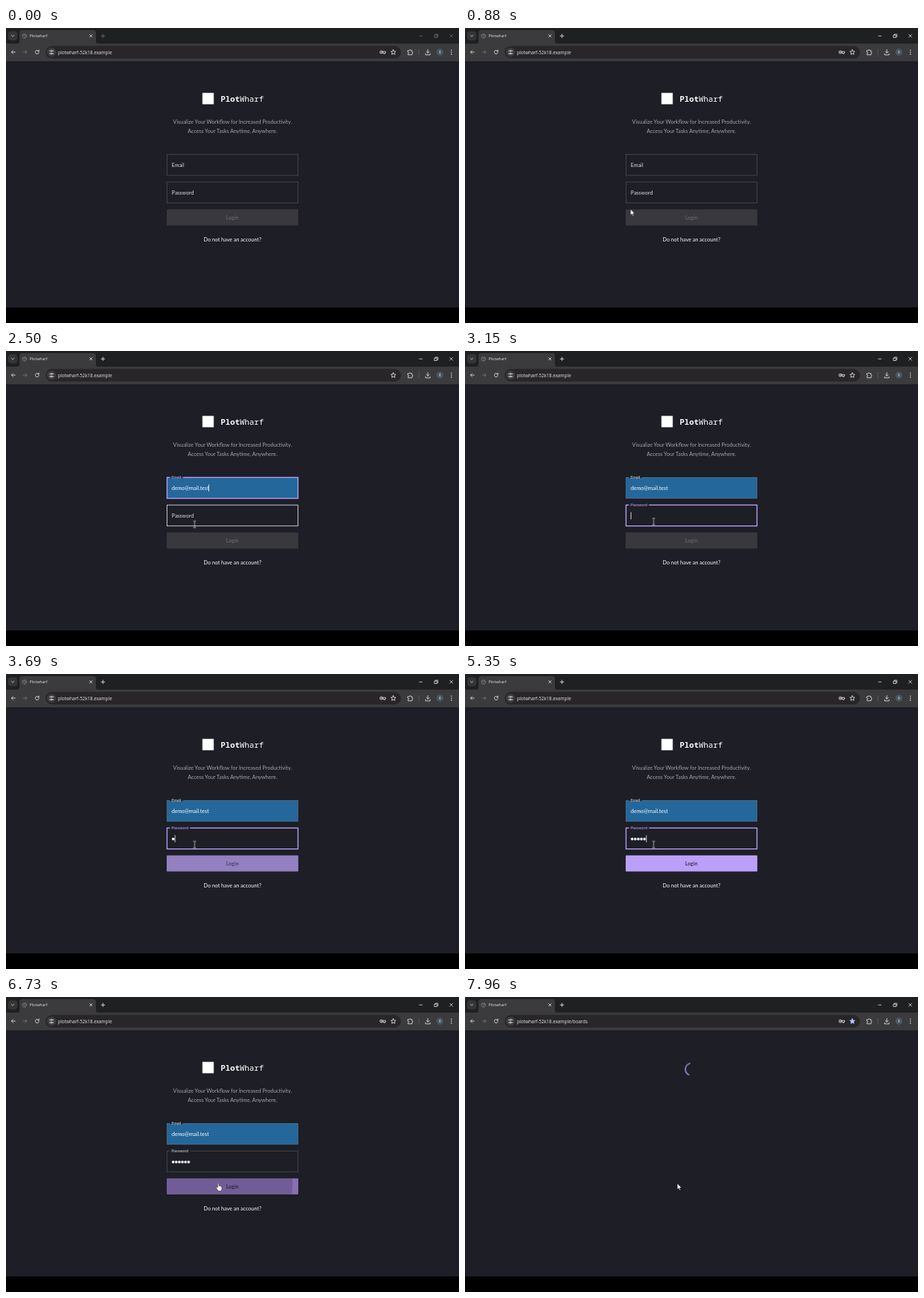
Recreate the animation shown at these times as an HTML page. Size 640 by 416 pixels, loop 8000 ms.

```html
<!DOCTYPE html>
<html lang="en">
<head>
<meta charset="utf-8">
<title>Plotwharf</title>
<style>
:root { --page: #1d1e26; --accent: #ba9ffb; --line: #4b4b50; --ui: #dedee0; --std: cubic-bezier(.4, 0, .2, 1); }
html, body { margin: 0; width: 100%; height: 100%; overflow: hidden; background: #000; }
svg { display: block; width: 100vw; height: 100vh; }
text { font: 7.5px Lato, sans-serif; fill: #fff; }
.ui text { font-family: "Open Sans", "Noto Sans", sans-serif; fill: #e6e6e8; }
.ui .tab { font-size: 5.6px; }
.ui .url { font-size: 6.45px; }
.ui .face { font-size: 5px; fill: #d5dde3; }
.word { font: 11.25px "Noto Sans Mono", "DejaVu Sans Mono", monospace; }
.word tspan { font-weight: 700; }
.hint { fill: #a6a6aa; }
.mid { text-anchor: middle; }
.icon { fill: none; stroke: var(--ui); stroke-width: .9; stroke-linecap: round; stroke-linejoin: round; }
.box { fill: none; stroke: var(--line); stroke-width: .9; }
.notch { fill: var(--page); }
.label { fill: #dededf; }
.caret { stroke: #fff; stroke-width: .8; }

/* hard changes hold their value until the next key */
.step { animation: 8s step-end infinite; }
.ease { animation: 8s var(--std) infinite; }
.float { animation: 8s cubic-bezier(0, 0, .2, 1) infinite; }

.win { animation-name: win; }
@keyframes win { 0% { stroke: #707174; } 5.75%, to { stroke: #e6e6e8; } }
.key { animation-name: key; }
@keyframes key { 0% { opacity: 1; } 26.375% { opacity: 0; } 36.25%, to { opacity: 1; } }
.path { animation-name: late; }
.form { animation-name: form; }
@keyframes late { 0% { opacity: 0; } 93.25%, to { opacity: 1; } }
@keyframes form { 0% { opacity: 1; } 93.25%, to { opacity: 0; } }
.star { animation-name: star; }
@keyframes star { 0% { fill: transparent; stroke: #dedee0; } 95.125%, to { fill: #b9c6fb; stroke: #b9c6fb; } }

/* email field */
.box.mail { animation-name: mail-box; }
@keyframes mail-box {
  0% { stroke: var(--line); stroke-width: .9; }
  12.2% { stroke: #e0e0e2; stroke-width: .9; }
  16.875% { stroke: var(--accent); stroke-width: 1.4; }
  33.625%, to { stroke: #5c7186; stroke-width: .7; }
}
.fill, .value { animation-name: fill; }
@keyframes fill { 0% { opacity: 0; } 25%, to { opacity: 1; } }
.label.mail { animation-name: mail-up; }
@keyframes mail-up {
  0%, 16.875% { transform: none; fill: #dededf; }
  19.375%, 33.625% { transform: translateY(-15.6px) scale(.75); fill: var(--accent); }
  36%, to { transform: translateY(-15.6px) scale(.75); fill: #dededf; }
}
.notch.mail { animation-name: mail-notch; }
@keyframes mail-notch { 0%, 16.875% { transform: scaleX(0); } 18.2%, to { transform: none; } }
.caret.mail { animation-name: mail-caret; }
@keyframes mail-caret {
  0% { opacity: 0; transform: none; }
  16.875% { opacity: 1; transform: none; }
  23.5% { opacity: 0; transform: none; }
  27.375% { opacity: 1; transform: translateX(51.5px); }
  33.625%, to { opacity: 0; transform: none; }
}

/* password field */
.box.pass { animation-name: pass-box; }
@keyframes pass-box {
  0% { stroke: var(--line); stroke-width: .9; }
  27.375% { stroke: #e0e0e2; stroke-width: .9; }
  33.625% { stroke: var(--accent); stroke-width: 1.4; }
  81.75%, to { stroke: var(--line); stroke-width: .9; }
}
.label.pass { animation-name: pass-up; }
@keyframes pass-up {
  0%, 33.625% { transform: none; fill: #dededf; }
  36.125%, 81.75% { transform: translateY(-15.3px) scale(.75); fill: var(--accent); }
  84.25%, to { transform: translateY(-15.3px) scale(.75); fill: #dededf; }
}
.notch.pass { animation-name: pass-notch; }
@keyframes pass-notch { 0%, 33.625% { transform: scaleX(0); } 34.9%, to { transform: none; } }
.dots { fill: none; stroke: #fff; stroke-width: 3.7; stroke-linecap: round; stroke-dasharray: 0 4.35; }
.cover { animation-name: typing; }
@keyframes typing {
  0% { transform: none; }
  44.75% { transform: translateX(4.35px); }
  48.75% { transform: translateX(8.7px); }
  53.125% { transform: translateX(13.05px); }
  59.125% { transform: translateX(17.4px); }
  63.5% { transform: translateX(21.75px); }
  67.5%, to { transform: translateX(26.1px); }
}
.caret.pass { animation-name: pass-caret; }
@keyframes pass-caret {
  0% { opacity: 0; } 33.625% { opacity: 1; } 40.25% { opacity: 0; }
  44.75% { opacity: 1; } 74.125%, to { opacity: 0; }
}

/* button */
.btn { animation-name: btn; }
@keyframes btn {
  0%, 44.75% { fill: #38383d; }
  47.875%, 73.25% { fill: var(--accent); }
  76.375%, to { fill: #866fb2; }
}
.shade { animation-name: shade; }
@keyframes shade { 0%, 73.25% { opacity: 0; } 76.375%, to { opacity: .3; } }
.login { animation-name: login; }
@keyframes login { 0%, 44.75% { fill: #707074; } 47.875%, to { fill: #1a1820; } }
.ripple { animation-name: ripple; }
@keyframes ripple {
  0%, 81.75% { transform: scale(0); opacity: .16; }
  85.5% { transform: scale(1); opacity: .16; }
  88%, to { transform: scale(1); opacity: 0; }
}

/* loading ring, mounted twice */
.ring { animation: spin 8s linear infinite; }
@keyframes spin {
  0%, 93.25% { transform: rotate(0); }
  95.12% { transform: rotate(38.6deg); }
  95.125% { transform: rotate(0); }
  to { transform: rotate(100.3deg); }
}
.ring circle { fill: none; stroke: var(--accent); stroke-width: 3.6; animation: dash 8s linear infinite; }
@keyframes dash {
  0% { stroke-dasharray: 1 200; stroke-dashoffset: 0; }
  93.25% { stroke-dasharray: 1 200; stroke-dashoffset: 0; animation-timing-function: cubic-bezier(.4, 0, .7, .45); }
  95.12% { stroke-dasharray: 10.5 200; stroke-dashoffset: -1.43; }
  95.125% { stroke-dasharray: 1 200; stroke-dashoffset: 0; animation-timing-function: cubic-bezier(.426, 0, .704, .535); }
  to { stroke-dasharray: 60.2 200; stroke-dashoffset: -9; }
}

/* pointer */
.move { animation: move 8s ease-in-out infinite; }
@keyframes move {
  0%, 8.625% { transform: translate(118px, 395px); animation-timing-function: ease-out; }
  13.5%, 20% { transform: translate(290px, 188px); animation-timing-function: linear; }
  24% { transform: translate(268px, 215px); animation-timing-function: ease-out; }
  26.875%, 27.375% { transform: translate(262px, 226px); }
  31%, 36.25% { transform: translate(266.5px, 244.5px); }
  37.75%, 67.5% { transform: translate(266.5px, 240.5px); }
  69.25%, 71.625% { transform: translate(277px, 243px); }
  74.4%, to { transform: translate(300px, 263px); }
}
.arrow { animation-name: arrow; }
@keyframes arrow {
  0% { opacity: 0; } 8.625% { opacity: 1; } 12.2% { opacity: 0; }
  23.2% { opacity: 1; } 27.375% { opacity: 0; } 93.25%, to { opacity: 1; }
}
.beam { fill: none; stroke: #d8d8da; stroke-width: .8; animation-name: beam; }
@keyframes beam {
  0% { opacity: 0; } 12.2% { opacity: 1; } 23.2% { opacity: 0; }
  27.375% { opacity: 1; } 73.25%, to { opacity: 0; }
}
.hand { animation-name: hand; }
@keyframes hand { 0% { opacity: 0; } 73.25% { opacity: 1; } 93.25%, to { opacity: 0; } }
.solid { fill: #fff; stroke: #16161a; stroke-width: .5; stroke-linejoin: round; }
</style>
</head>
<body>
<svg viewBox="0 0 640 416">
  <clipPath id="btn"><rect x="227" y="255.7" width="186" height="22.8" rx=".8"/></clipPath>
  <rect width="640" height="416"/>
  <rect width="640" height="23" fill="#1e2021"/>
  <rect y="22" width="640" height="25.3" fill="#3b3a3c"/>
  <rect y="47.2" width="640" height="346.8" fill="var(--page)"/>

  <g class="ui">
    <rect x="3" y="4.5" width="13" height="13" rx="4" fill="#343537"/>
    <path class="icon" d="M7.7 10.3l1.8 1.7 1.8-1.7"/>
    <path d="M15 22.5q4 0 4-4V7q0-4 4-4H123q4 0 4 4v11.500q0 4 4 4z" fill="#3b3a3c"/>
    <g class="icon" style="stroke:#85868a;stroke-width:.7">
      <circle cx="26" cy="11.300" r="3"/><path d="M23.500 10l2 .4.2 1.500 1 .6-.5 1.500M27 8.600l-.4 1.400 2 1"/>
    </g>
    <text class="tab" x="33.300" y="13.300">Plotwharf</text>
    <path class="icon" d="M118.300 9.400l3.400 3.400m0-3.400l-3.400 3.400"/>
    <g class="icon">
      <path class="win step" d="M134.500 11.200h5m-2.500-2.500v5"/>
      <path class="win step" stroke-width=".8" d="M584 11.200h4M605.500 10h3.500v3.500h-3.500zM606.600 9.900V8.800h3.600v3.600h-1M627 9l4.200 4.200m0-4.200l-4.200 4.200"/>
    </g>

    <path class="icon" d="M13 34H7.800m2.300-2.300L7.800 34l2.300 2.300"/>
    <path class="icon" style="stroke:#77777b" d="M24.400 34h5.200m-2.300-2.300l2.300 2.300-2.300 2.300"/>
    <path class="icon" d="M46.300 32.700a2.600 2.600 0 1 0 .3 1.800M46.600 31v1.900h-1.900"/>
    <rect x="56" y="25.300" width="502" height="17.800" rx="8.900" fill="#282629"/>
    <circle cx="64.300" cy="34.100" r="6.400" fill="#3c3b3e"/>
    <path class="icon" d="M61.500 32.300h1.700m2.800 0h1.300M61.500 36h1.300m2.700 0h1.800"/>
    <g class="icon"><circle cx="64.400" cy="32.300" r="1"/><circle cx="64.100" cy="36" r="1"/></g>
    <text class="url" x="73.200" y="36.500">plotwharf-52k18.example<tspan class="path step" fill="none"></tspan></text>
    <text class="url path step" x="150" y="36.500">/boards</text>
    <g class="icon key step">
      <circle cx="530.300" cy="34.100" r="2"/><circle cx="530.300" cy="34.100" r=".3"/>
      <path d="M532.300 33.200h4v1.900h-1v1.200h-1.500v-1.200h-1.500"/>
    </g>
    <path class="icon star step" d="M547.200 30.600l1 2.300 2.500.2-1.900 1.700.6 2.500-2.200-1.300-2.200 1.300.6-2.500-1.900-1.700 2.500-.2z"/>
    <path class="icon" d="M568 31.800h1.800a1 1 0 0 1 2.200 0h1.700v2a1 1 0 0 1 0 2.100v1.900h-5.700v-1.900a1 1 0 0 0 0-2.100z"/>
    <path d="M583.300 30v8.500" stroke="#5d5d61" stroke-width=".8"/>
    <path class="icon" d="M596 30.300v4.900m-2.100-2l2.100 2.100 2.100-2.100M592.800 36.200v1.700h6.400v-1.700"/>
    <circle cx="613" cy="34" r="4.900" fill="#485760"/>
    <text class="face mid" x="613" y="35.900">R</text>
    <g fill="#dedee0"><circle cx="629.300" cy="31.300" r=".8"/><circle cx="629.300" cy="34.100" r=".8"/><circle cx="629.300" cy="36.900" r=".8"/></g>
  </g>

  <g class="form step">
    <rect x="277.500" y="91.500" width="16" height="16" fill="#fff"/>
    <text class="word" x="303.300" y="103.800"><tspan>Plot</tspan>Wharf</text>
    <text class="hint mid" x="320" y="135.200">Visualize Your Workflow for Increased Productivity.</text>
    <text class="hint mid" x="320" y="148.200">Access Your Tasks Anytime, Anywhere.</text>

    <rect class="fill step" x="227.300" y="178" width="185.400" height="30" fill="#24679b"/>
    <rect class="box mail step" x="227.500" y="178.300" width="185" height="29.500"/>
    <g transform="translate(231.500 177.300)"><rect class="notch mail float" width="18.500" height="1.700"/></g>
    <g transform="translate(234 195.700)"><text class="label mail float">Email</text></g>
    <text class="value step" x="234" y="196.400">demo@mail.test</text>
    <path class="caret mail step" d="M234.500 188.300v10"/>

    <path class="dots" d="M236.200 232.700h22"/>
    <g class="cover step">
      <rect x="234" y="226" width="32" height="13" fill="var(--page)"/>
      <path class="caret pass step" d="M234.500 227.300v10"/>
    </g>
    <rect class="box pass step" x="227.500" y="217.200" width="185" height="29.500"/>
    <g transform="translate(231.500 216.200)"><rect class="notch pass float" width="28.500" height="1.900"/></g>
    <g transform="translate(234 234.600)"><text class="label pass float">Password</text></g>

    <rect class="shade ease" x="226.500" y="257" width="187" height="23.500" rx="1.500"/>
    <rect class="btn ease" x="227" y="255.700" width="186" height="22.800" rx=".8"/>
    <g clip-path="url(#btn)"><g transform="translate(300 263)"><circle class="ripple ease" r="116"/></g></g>
    <text class="login mid ease" x="319.900" y="270">Login</text>
    <text class="mid" x="320" y="300.800">Do not have an account?</text>
  </g>

  <g class="path step"><g transform="translate(320 102) scale(.426)"><g class="ring"><circle r="20.200"/></g></g></g>

  <g class="move">
    <path class="solid arrow step" d="M0 0v8.300l1.900-1.700 1.300 3 1.300-.6-1.300-2.900h2.600z"/>
    <path class="beam step" d="M-2-4.800q2 0 2 1V3.800q0 1-2 1M2-4.800q-2 0-2 1M0 3.800q0 1 2 1"/>
    <path class="solid hand step" d="M-.9.500q0-.9.800-.9t.9.900v3q.9-.6 1.500.2.900-.5 1.400.3 1.200-.3 1.200.9v2.300q0 1.800-1 3.400H-.2Q-1.600 8.200-2.900 6.300q-.5-1 .4-1.300.7-.1 1.600 1z"/>
  </g>
</svg>
</body>
</html>
```
